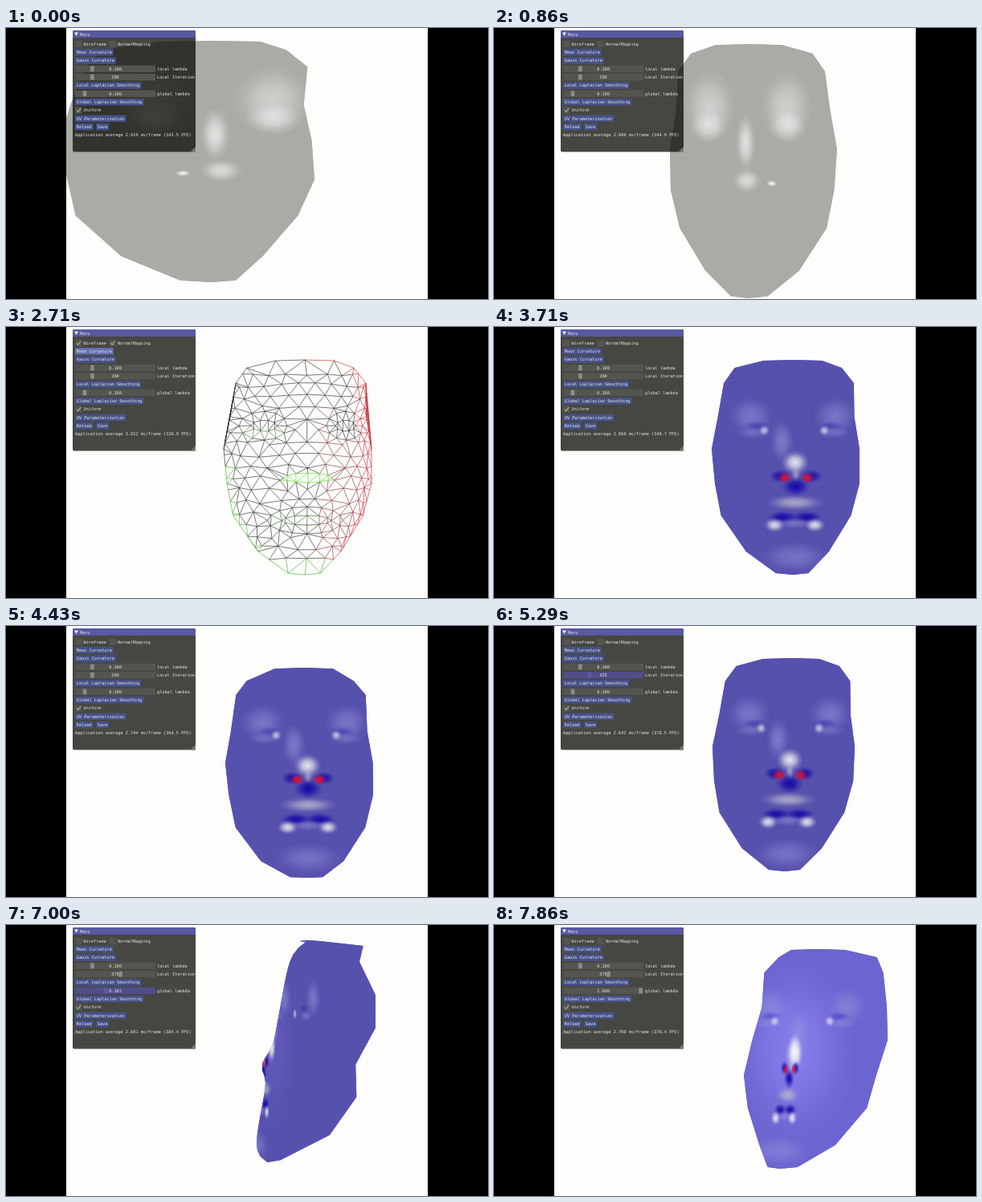
Recreate the animation shown at these times as an HTML page. Size 600 by 338 pixels, loop 8 s.

```html
<!DOCTYPE html>
<html lang="en">
<head>
<meta charset="utf-8">
<title>Mesh viewer</title>
<style>
html, body { margin: 0; width: 100%; height: 100%; overflow: hidden; background: #000; }
svg { display: block; width: 100vw; height: 100vh; }
text { font: 5.23px "DejaVu Sans Mono", "Liberation Mono", monospace; fill: #e8e8e8; white-space: pre; }
</style>
</head>
<body>
<svg id="stage" viewBox="0 0 600 338">
  <defs id="defs"><clipPath id="face"></clipPath></defs>
  <rect x="75" width="450" height="338" fill="#fdfdfb"/>
  <g id="scene"></g>
  <g id="panel"></g>
  <path d="M0 0H75V338H0ZM525 0H600V338H525Z"/>
</svg>
<script>
const $ = id => document.getElementById(id);
const LOOP = 8000, STEPS = 56;
const clamp = (v, a, b) => Math.min(b, Math.max(a, v));
const mix = (a, b, k) => Array.isArray(a) ? a.map((v, i) => mix(v, b[i], k)) : a + (b - a) * k;

// Value of a keyed track [[step, value], ...] at a step
function track(keys, n) {
  for (let i = 1; i < keys.length; i++) {
    const [n0, v0] = keys[i - 1], [n1, v1] = keys[i];
    if (n <= n1) return mix(v0, v1, clamp((n - n0) / (n1 - n0), 0, 1));
  }
  return keys[keys.length - 1][1];
}

// Face mask: x to the right, y down, z towards the viewer; mirrored in x.
// One half of the rim, from the forehead to the chin.
const TALL = 134;
const rim = [
  [0, -TALL, -20], [36, -133, -22], [66, -124, -68], [80, -105, -62], [84, -63, -89], [91, -23, -94],
  [89, 20, -78], [80, 60, -90], [51, 105, -75], [20, 132, -29], [0, TALL, -20]
];
const flip = ([x, y, z]) => [-x, y, z];
const rimAt = track.bind(null, rim.map(p => [p[1], p]));
const ridge = y => -20 * (y / TALL) ** 12 + 10 * Math.exp(-(((y - 14) / 15) ** 2));
const onFace = (x, y) => {
  const [w, , z] = rimAt(y);
  return [x, y, mix(ridge(y), z, Math.min(1, Math.abs(x) / (w || 1)) ** 3)];
};
const profile = Array.from({ length: 34 }, (_, i) => -TALL + i * 2 * TALL / 33).map(y => [0, y, ridge(y)]);
const solid = [...rim, ...rim.map(flip), ...profile];

// Pose: yaw and pitch in degrees, lean, then the box the face fills (left, top, right, bottom)
const near = [-14, 0, 0, 66, 16, 384, 317];
const tall = [4, 0, 0, 219, 20, 427, 337];
const front = [-7, 0, 0, 271, 41, 455, 309];
const raised = [-6, 8, 0, 273, 52, 457, 314];
const level = [-5, 0, .03, 272, 40, 449, 306];
const side = [70, -4, .25, 312, 19, 460, 296];
const turned = [18, 0, .18, 311, 30, 490, 304];
const moves = [
  [0, near], [6, tall], [8, front], [27, front], [30, raised], [31, raised], [32, level],
  [34, mix(level, side, .7)], [36, level], [41, level], [44, turned], [47, side], [52, side], [55, turned]
];

function camera([yaw, pitch, lean, left, top, right, bottom]) {
  const a = yaw * Math.PI / 180, b = pitch * Math.PI / 180;
  const turn = ([x, y, z]) => {
    const h = y * Math.cos(b) - z * Math.sin(b), d = y * Math.sin(b) + z * Math.cos(b);
    return [x * Math.cos(a) - d * Math.sin(a) - lean * h, h];
  };
  const seen = solid.map(turn), xs = seen.map(p => p[0]), ys = seen.map(p => p[1]);
  const x0 = Math.min(...xs), y0 = Math.min(...ys);
  const sx = (right - left) / (Math.max(...xs) - x0), sy = (bottom - top) / (Math.max(...ys) - y0);
  const project = p => {
    const [x, y] = turn(p);
    return [left + (x - x0) * sx, top + (y - y0) * sy];
  };
  return { yaw, project, sx: sx * Math.max(.3, Math.cos(a)), sy };
}

function silhouette({ project }) {
  const shape = pts => `<path d="M${pts.map(p => project(p).map(v => v.toFixed(1))).join(' ')}Z"/>`;
  const other = rim.map(flip), back = [...profile].reverse();
  return shape([...rim, ...[...other].reverse()]) + shape([...rim, ...back]) + shape([...other, ...back]);
}

// Soft spots on the face
const tones = { white: '#f6f6f4', pale: '#9794da', grey: '#b8b6ca', deep: '#1208a6', red: '#e0102c', glow: '#9288f8' };
for (const name in tones) {
  const stop = (at, alpha) => `<stop offset="${at}" stop-color="${tones[name]}" stop-opacity="${alpha}"/>`;
  $('defs').insertAdjacentHTML('beforeend',
    `<radialGradient id="${name}">${stop(0, 1)}${stop(.4, .7)}${stop(.75, .2)}${stop(1, 0)}</radialGradient>`);
}
function painter({ project, sx, sy }) {
  const spot = (tone, x, y, rx, ry, alpha = 1) => {
    const [cx, cy] = project(onFace(x, y));
    return `<ellipse cx="${cx}" cy="${cy}" rx="${rx * sx}" ry="${ry * sy}" fill="url(#${tone})" opacity="${alpha}"/>`;
  };
  const pair = (tone, x, ...rest) => spot(tone, -x, ...rest) + spot(tone, x, ...rest);
  return { spot, pair };
}

function greyFace(cam) {
  const { spot, pair } = painter(cam);
  return pair('white', 42, -68, 29, 40, .5) + pair('white', 43, -48, 21, 18, .6)
    + spot('white', -2, -30, 11, 30, .75)
    + spot('white', 0, 10, 16, 13, .65)
    + spot('white', 27 * Math.sign(cam.yaw), 13, 6, 3.5);
}

function curvedFace(cam, smooth, shine) {
  const { spot, pair } = painter(cam);
  const gap = 14 - 8.5 * smooth, half = 27 - 15 * smooth, q = gap / 12;
  return spot('glow', 0, -10, 85, 115, .75 * shine)
    + pair('pale', 52, -64, 28, 24, .55)
    + pair('deep', 46, -52, 16, 6, .3)
    + pair('pale', 50, -43, 22, 7, .4)
    + pair('white', 37, -46, 7, 7, .65)
    + spot('pale', -16 * (1 - smooth), -32, 15, 28, .6)
    + spot('white', 0, -6, 9 + 7 * q, 15 + 8 * smooth, .9)
    + spot('white', 0, -10, 9, 14 + 8 * smooth, .8 * smooth)
    + pair('deep', 1.4 * gap, 11, 12 * q, 9, .9)
    + spot('deep', 0, 24, 16 * q, 13)
    + pair('red', gap, 13, 8 * q, 7.5)
    + spot('grey', 0, 8, 5 * q, 10, .7)
    + spot('grey', 0, 44, 1.35 * half, 10, .85)
    + pair('deep', .55 * half, 62, .75 * half, 8, .95)
    + pair('white', .92 * half, 72, .4 * half + 2, 9, .85)
    + spot('pale', 0, 70, .8 * half, 7, .5)
    + spot('pale', 0, 112, 44, 20, .5);
}

// Triangle mesh, seeded and symmetric
let seed = 7;
const rand = () => (seed = seed * 16807 % 2147483647) / 2147483647;

function meshPoints() {
  // centre, radii and number of points of the loops around eye, mouth and nose
  const loops = [[50, -52, 26, 18, 12], [50, -52, 14, 7, 10], [0, 66, 46, 17, 16], [0, 66, 30, 6, 12],
    [0, 13, 29, 6, 12]];
  const pts = [];
  const add = (x, y) => {
    pts.push([x, y]);
    if (x > .5) pts.push([-x + rand() * .1, y + rand() * .1]);
  };
  for (const [x, y, rx, ry, count] of loops)
    for (let i = 0; i < count; i++) {
      const a = i / count * 2 * Math.PI, px = x + rx * Math.cos(a);
      if (px > -.1) add(px + rand() * .3, y + ry * Math.sin(a) + rand() * .3);
    }
  const free = (x, y) => loops.every(([cx, cy, rx, ry]) => Math.hypot((x - cx) / (rx + 5), (y - cy) / (ry + 5)) > 1);
  for (let row = 0, y = -117; y < 128; row++, y += 14.5) {
    const w = rimAt(y)[0], cols = Math.max(2, Math.round(w / 17));
    for (let j = row % 2 / 2; j < cols; j++) {
      const s = j / cols, dx = j ? (rand() - .5) * 5 : 0;
      const x = w * Math.sin(1.35 * s) / Math.sin(1.35) * (1 - .02 * rand()) + dx, py = y + (rand() - .5) * 6;
      if (x < w - 2 && free(x, py)) add(x, py);
    }
    add(w, y);
  }
  rim.forEach(([x, y]) => add(x, y));
  return pts;
}

function circle(a, b, c) {
  const bx = b[0] - a[0], by = b[1] - a[1], cx = c[0] - a[0], cy = c[1] - a[1];
  const d = 2 * (bx * cy - by * cx) || 1e-9, b2 = bx * bx + by * by, c2 = cx * cx + cy * cy;
  const x = (cy * b2 - by * c2) / d, y = (bx * c2 - cx * b2) / d;
  return [a[0] + x, a[1] + y, x * x + y * y];
}

// Incremental Delaunay triangulation, returned as a list of edges
function meshEdges(pts) {
  const n = pts.length, all = [...pts, [-9000, -9000], [9000, -9000], [0, 9000]];
  const tri = (a, b, c) => ({ v: [a, b, c], o: circle(all[a], all[b], all[c]) });
  const sides = ({ v: [a, b, c] }) => [[a, b], [b, c], [c, a]];
  const key = (a, b) => Math.min(a, b) + '-' + Math.max(a, b);
  let tris = [tri(n, n + 1, n + 2)];
  pts.forEach(([x, y], i) => {
    const hole = new Map();
    tris = tris.filter(t => {
      if ((x - t.o[0]) ** 2 + (y - t.o[1]) ** 2 >= t.o[2]) return true;
      for (const [a, b] of sides(t)) {
        const k = key(a, b);
        hole.has(k) ? hole.delete(k) : hole.set(k, [a, b]);
      }
      return false;
    });
    for (const [a, b] of hole.values()) tris.push(tri(a, b, i));
  });
  const edges = new Map();
  for (const t of tris)
    for (const [a, b] of sides(t)) if (a < n && b < n) edges.set(key(a, b), [pts[a], pts[b]]);
  return [...edges.values()];
}
const edges = meshEdges(meshPoints());

const inNose = (x, y) => Math.abs(x) < 30 && Math.abs(y - 13) < 7;
function normalTone(x, y) {
  const u = x / rimAt(y)[0];
  if (inNose(x, y)) return '#5ad428';
  if (y > 122 || (y > 0 && u < -.94)) return '#48b030';
  if (u > .78) return '#c0303c';
  if (u > .2 && y > -70 && y < 108 && Math.hypot((x - 50) / 28, (y + 52) / 20) > 1) return '#803a3e';
  if (Math.abs(y - 64) < 7 && Math.abs(x) < 42) return '#3c6a30';
  if (Math.abs(y + 44) < 5 && Math.abs(x + 50) < 22) return '#4c7a3c';
  return '#303030';
}
const curveTone = (x, y) => inNose(x, y) ? '#d01830' : '#5450aa';
const plainTone = () => '#9a9d97';

function wire({ project }, tone) {
  const paths = {}, spotOn = ([x, y]) => project(onFace(x, y)).map(v => v.toFixed(1)).join(' ');
  for (const [p, q] of edges) {
    const c = tone((p[0] + q[0]) / 2, (p[1] + q[1]) / 2);
    paths[c] = (paths[c] || '') + `M${spotOn(p)}L${spotOn(q)}`;
  }
  return Object.entries(paths).map(([c, d]) => `<path d="${d}" fill="none" stroke="${c}" stroke-width=".65"/>`).join('');
}

// Menu widgets
const CHAR = 3.15;
const rowY = i => 15.7 + i * 10.33;
const rect = (x, y, w, h, fill, more = '') => `<rect x="${x}" y="${y}" width="${w}" height="${h}" fill="${fill}" ${more}/>`;
const label = (x, row, s, anchor = 'start') =>
  `<text x="${x}" y="${rowY(row) + 6.1}" text-anchor="${anchor}">${s}</text>`;
const button = (x, row, s, hot) =>
  rect(x, rowY(row), s.length * CHAR + 3.6, 8.5, hot ? '#6272b0' : '#465288') + label(x + 1.8, row, s);
const check = (x, row, s, on) => rect(x, rowY(row), 8.5, 8.5, '#55554f')
  + (on ? `<path d="M${x + 2} ${rowY(row) + 4.4}l1.8 2 3.2-4.6" fill="none" stroke="#b4b4b0" stroke-width="1.1"/>` : '')
  + label(x + 10.5, row, s);
const slider = (row, s, value, k, live) => rect(86, rowY(row), 100, 8.5, live ? '#504e88' : '#55554f')
  + rect(86.3 + 94 * k, rowY(row) + .9, 4.6, 6.7, live ? '#5f59ae' : '#8c8c88')
  + label(136, row, value, 'middle') + label(188, row, s);

const pace = [[0, 2.9194], [6, 2.8997], [19, 3.0221], [31, 2.7436], [41, 2.574], [49, 2.6013], [55, 2.7]];
const rounds = [[36, 200], [39, 575]];
const weight = [[47, .1], [49, .383], [51, 1]];

function menu(n) {
  const ms = track(pace, n), loops = track(rounds, n), global = track(weight, n);
  return rect(83, 3, 153, 151.5, '#0e0e08', 'rx="2" fill-opacity=".76"')
    + '<path d="M83 12V5Q83 3 85 3H234Q236 3 236 5V12Z" fill="#5858a2"/>'
    + '<path d="M85 5.6H90L87.5 10Z" fill="#e8e8e8"/><text x="92" y="9.5">Menu</text>'
    + check(86, 0, 'Wireframe', n >= 11 && n < 26)
    + check(128.5, 0, 'NormalMapping', n >= 14 && n < 23)
    + button(86, 1, 'Mean Curvature', n >= 18 && n <= 20)
    + button(86, 2, 'Gauss Curvature')
    + slider(3, 'local lambda', '0.100', .2)
    + slider(4, 'Local Iteration', Math.round(loops), loops / 1000, n > 36 && n < 40)
    + button(86, 5, 'Local Laplacian Smoothing', n === 40)
    + slider(6, 'global lambda', global.toFixed(3), global, n > 47 && n < 52)
    + button(86, 7, 'Global Laplacian Smoothing', n === 52)
    + check(86, 8, 'Uniform', true)
    + button(86, 9, 'UV Parameterization')
    + button(86, 10, 'Reload') + button(112, 10, 'Save')
    + `<text x="86" y="134.6">Application average ${ms.toFixed(3)} ms/frame (${(1000 / ms).toFixed(1)} FPS)</text>`
    + '<path d="M236 148V154.5H229.5Z" fill="#77776f"/>';
}

function scene(n) {
  const cam = camera(track(moves, n));
  if (n >= 11 && n < 26) return wire(cam, n < 14 ? plainTone : n < 20 ? normalTone : curveTone);
  const shape = silhouette(cam);
  $('face').innerHTML = shape;
  const curved = n >= 20, smooth = n < 40 ? 0 : n < 52 ? .55 : 1;
  const fill = !curved ? '#a8aba6' : smooth < 1 ? '#5751ae' : '#6c64d0';
  const shine = smooth * clamp(Math.cos(cam.yaw * Math.PI / 180), 0, 1);
  return `<g fill="${fill}">${shape}</g><g clip-path="url(#face)">${curved ? curvedFace(cam, smooth, shine) : greyFace(cam)}</g>`;
}

let shown = -1;
const start = performance.now();
function tick() {
  const t = (performance.now() - start) % LOOP;
  const n = Math.floor((t + 5) / LOOP * STEPS) % STEPS;
  if (n !== shown) {
    shown = n;
    $('scene').innerHTML = scene(n);
    $('panel').innerHTML = menu(n);
  }
  requestAnimationFrame(tick);
}
tick();
</script>
</body>
</html>
```
